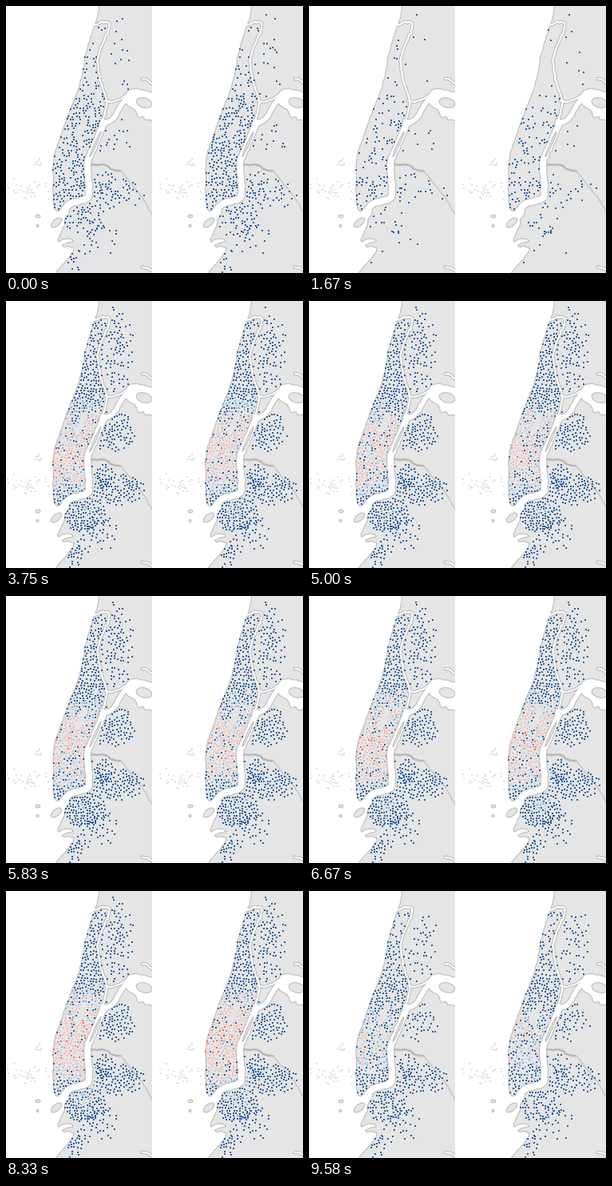
Write a matplotlib script that moves like this. It is 372x334 px and loops after 10 s.

```python
import numpy as np
import matplotlib.pyplot as plt
from matplotlib.animation import FuncAnimation
from matplotlib.patches import Ellipse, Polygon
from matplotlib.path import Path

W, H, DPI = 372, 334, 100
HOURS, LOOP_MS = 24, 10000
PX = 72 / DPI
LAND, WATER, SHORE, FAINT = "#e5e5e5", "white", "#b8b8b8", "#e2e2e2"
PALETTE = np.array(["#2a5f9f", "#7db1de", "#bcd3e8", "#f6b9b1", "#ee6f60"])
STEPS = [0.25, 0.38, 0.44, 1.25]
GAP = 2.9

rng = np.random.default_rng(11)


def curve(keys, closed=False, steps=6, rough=0.3):
    """Slightly ragged Catmull-Rom curve through the key points."""
    k = np.array(keys, float)
    ends = (k[-1:], k[:2]) if closed else (k[:1], k[-1:])
    k = np.vstack([ends[0], k, ends[1]])
    t = np.linspace(0, 1, steps, endpoint=False)[:, None]
    parts = [0.5 * (2 * b + (c - a) * t + (2 * a - 5 * b + 4 * c - d) * t ** 2
                    + (3 * b - a - 3 * c + d) * t ** 3)
             for a, b, c, d in zip(k, k[1:], k[2:], k[3:])]
    line = np.vstack(parts)
    return line + rng.normal(0, rough, line.shape)


# Key points of the shore, from the north down to the southern edge
west = curve([(117, -20), (115, 10), (111, 25), (104, 45), (98, 70), (92, 100),
              (80, 130), (70, 159), (62, 181), (59, 205), (60, 250), (69, 256),
              (76, 250)], rough=0.4)
south = curve([(79, 250), (79, 258), (74, 268), (73, 275), (65, 294), (75, 291),
               (84, 294), (71, 300), (85, 303), (78, 315), (67, 328),
               (58, 340)], rough=0.4)
land = np.vstack([west, south, [(200, 345), (200, -20)]])

harlem = curve([(109, 24), (114, 23), (121, 20), (129, 22), (127, 34),
                (118, 54), (115, 72), (118, 92), (125, 114), (126, 124),
                (121, 144), (121, 148)])
east = curve([(122, 146), (115, 165), (107, 183), (102, 198), (104, 228),
              (102, 240), (88, 245), (78, 249), (68, 262)])
gate = curve([(121, 148), (134, 141), (141, 130), (149, 118), (160, 114)])
kill = curve([(124, 118), (134, 120), (150, 112)])
bay = curve([(148, 117), (153, 107), (163, 104), (183, 108), (205, 108),
             (205, 143), (177, 142), (172, 138), (166, 139), (162, 130),
             (154, 125)], closed=True)
inlet = curve([(171, 91), (176, 92), (183, 97), (192, 99)])
corner = curve([(171, 327), (177, 328), (183, 331), (192, 334)])
RIVERS = [(harlem, 2.2), (east, 8), (gate, 6), (kill, 2), (inlet, 2),
          (corner, 2)]

creek = curve([(106, 199), (124, 199), (133, 205), (144, 206)])
brook = curve([(144, 206), (153, 218), (170, 239), (183, 261), (188, 272)])

# Centre, half sizes and angle
ISLANDS = [(173, 121, 10, 6, 15), (112, 173, 17, 1.3, -66),
           (63, 271, 8, 4, -40), (40, 263, 3, 1.8, 0), (39.5, 275, 1.5, 1.5, 0)]

far_shore = np.vstack([rng.normal((26, 231), (11, 7), (34, 2)),
                       rng.normal((40, 195), (3, 3), (12, 2))])

MANHATTAN = Path(np.vstack([west[12:], east[::-1], harlem[::-1]]))
PARK = Path([(96, 138), (103, 141), (92, 168), (85, 165)])

# Clusters outside the island: centre, spread, dots, thinning in quiet hours
CLUSTERS = [((97, 266), (14, 12), 150, 2), ((140, 236), (18, 10), 100, 2),
            ((118, 218), (8, 9), 35, 2), ((112, 290), (14, 14), 45, 2),
            ((84, 314), (9, 10), 25, 2), ((137, 62), (12, 29), 95, 4.5),
            ((133, 163), (15, 14), 80, 4.5)]


def on_land(p):
    ok = Path(land).contains_points(p) & ~Path(bay).contains_points(p)
    for line, width in RIVERS:
        gap = np.hypot(*(p[:, None] - line).transpose(2, 0, 1)).min(axis=1)
        ok &= gap > width / 2 + 1
    return ok


def spaced(tries, count):
    """The first count tries that keep their distance from each other."""
    kept = np.empty((0, 2))
    for p in tries:
        if len(kept) == count:
            break
        if not len(kept) or ((kept - p) ** 2).sum(axis=1).min() > GAP ** 2:
            kept = np.vstack([kept, p])
    return kept


def island_dots():
    tries = rng.integers((57, 24), (131, 257), (9000, 2))
    inside = MANHATTAN.contains_points(tries) & ~PARK.contains_points(tries)
    inside &= rng.random(len(tries)) < (tries[:, 1] + 15) / 125
    tries = tries[inside]
    p = spaced(tries[on_land(tries)], 450)
    y = p[:, 1]
    core = np.exp(-((y - 192) / np.where(y < 192, 58, 42)) ** 2)
    return p, 1 + np.clip((150 - y) / 40, 0, None), core


def cluster_dots(center, spread, count, thinning):
    z = rng.standard_normal((count * 6, 2))
    z = z[np.hypot(*z.T) < 1.95]
    tries = np.rint(center + z * spread)
    tries = tries[on_land(tries) & ~MANHATTAN.contains_points(tries)]
    p = spaced(tries, count)
    x, y = p.T
    core = 0.28 * np.exp(-((x - 98) / 20) ** 2 - ((y - 262) / 24) ** 2)
    core += 0.35 * np.exp(-((x - 110) / 6) ** 2 - ((y - 228) / 14) ** 2)
    return p, np.full(len(p), thinning), core


groups = [island_dots()] + [cluster_dots(*c) for c in CLUSTERS]
POINTS, THINNING, CORE = (np.concatenate(g) for g in zip(*groups))
RANK = rng.random(len(POINTS))


def bump(x, center, width):
    return np.exp(-((x - center) / width) ** 2)


def sigmoid(x):
    return 1 / (1 + np.exp(-x))


def busy(hour):
    """Share of places in use, lowest at four in the morning."""
    since = (hour - 4 + 8) % 24 - 8
    return 1 - 0.72 * bump(since, 0, 4.7 if since < 0 else 2.6)


def heat(hour):
    """Strength of the warm colours, with a morning and an evening peak."""
    day = sigmoid(1.5 * (hour - 7)) * sigmoid(22 - hour)
    return day * (0.62 + 0.13 * bump(hour, 9, 1.2) + 0.38 * bump(hour, 18, 2.5))


def dots(hour, side):
    draw = np.random.default_rng(100 * side + hour)
    n = len(POINTS)
    rank = (RANK + 0.35 * draw.random(n)) % 1
    shown = rank < 0.08 + 0.92 * busy(hour) ** THINNING
    score = heat(hour) * CORE * (1 + 0.6 * draw.standard_normal(n))
    return POINTS[shown], PALETTE[np.digitize(score[shown], STEPS)]


def draw_map(ax):
    ground = ax.add_patch(Polygon(land, fc=LAND, ec=SHORE, lw=PX))
    ax.plot(*creek.T, color=SHORE, lw=2.5 * PX)
    ax.plot(*brook.T, color=SHORE, lw=PX)
    for color, edge in [(SHORE, 2), (WATER, 0)]:
        shapes = [ax.add_patch(Polygon(bay, fc=color, ec=color, lw=edge * PX,
                                       zorder=2))]
        for line, width in RIVERS:
            shapes += ax.plot(*line.T, color=color, lw=(width + edge) * PX,
                              solid_joinstyle="round")
        if edge:
            for shape in shapes:
                shape.set_clip_path(ground)
    for x, y, rx, ry, angle in ISLANDS:
        ax.add_patch(Ellipse((x, y), 2 * rx, 2 * ry, angle=angle, fc=LAND,
                             ec=SHORE, lw=PX, zorder=3))
    ax.scatter(*far_shore.T, s=(1.6 * PX) ** 2, marker="s", color=FAINT, lw=0)


def add_panel(fig, left, right, origin):
    ax = fig.add_axes([left / W, 0, (right - left) / W, 1])
    ax.set_xlim(left - origin, right - origin)
    ax.set_ylim(H, 0)
    ax.axis("off")
    draw_map(ax)
    return ax.scatter([], [], s=(2 * PX) ** 2, marker="s", lw=0,
                      antialiased=False, zorder=4)


fig = plt.figure(figsize=(W / DPI, H / DPI), dpi=DPI, facecolor="white")
panels = [add_panel(fig, 0, 183, 0), add_panel(fig, 183, W, 191)]


def update(hour):
    for side, panel in enumerate(panels):
        places, colors = dots(hour, side)
        panel.set_offsets(places)
        panel.set_facecolor(colors)
    return panels


anim = FuncAnimation(fig, update, frames=HOURS, interval=LOOP_MS / HOURS,
                     repeat=True, repeat_delay=0, blit=False)
plt.show()
```
